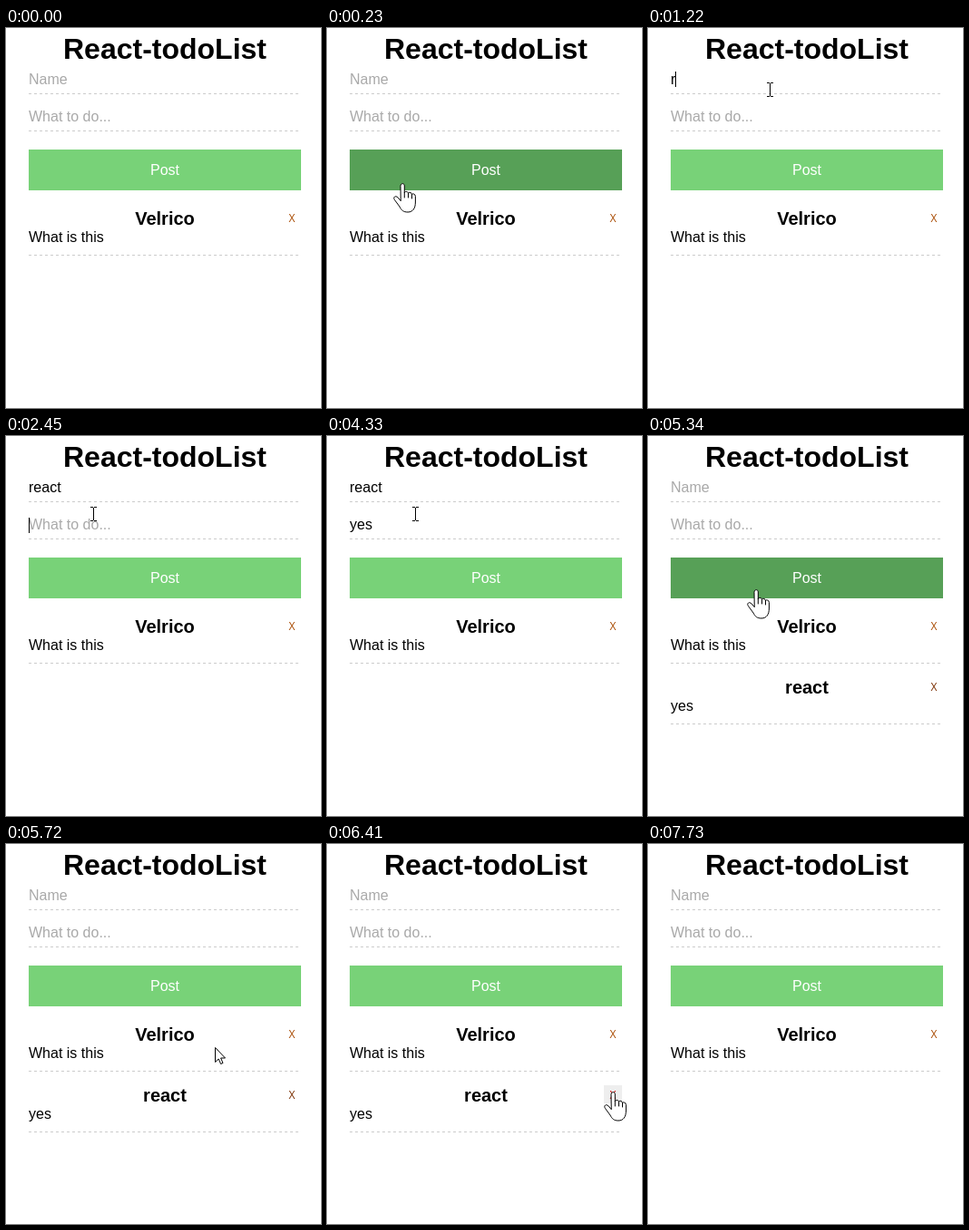
These frames come from a looping animation (347x419 px, 8510 ms). An HTML page:

```html
<!DOCTYPE html>
<html lang="en">
<head>
<meta charset="utf-8">
<title>React-todoList</title>
<style>
  html, body { margin: 0; width: 100%; height: 100%; overflow: hidden; background: #fff; }
  body { position: relative; font: 16px/17px "Liberation Sans", Arial, sans-serif; color: #000; }
  body * { position: absolute; margin: 0; box-sizing: border-box; white-space: pre; }
  h1 { left: 25px; top: 5px; width: 300px; font-size: 32px; line-height: 36px; text-align: center; }
  .field, .item { left: 25px; width: 300px;
    background: repeating-linear-gradient(90deg, #ccc 0 3px, transparent 3px 6px) bottom / 100% 1px no-repeat; }
  .field { height: 26px; }
  .field.empty .text { color: #a9a9a9; }
  .text { left: 0; top: 1px; }
  .caret { left: 100%; top: 0; width: 1px; height: 17px; background: #000; }
  .empty .caret { left: 0; top: 1px; }
  #post { left: 25px; top: 134px; width: 300px; height: 45px; padding-top: 14px;
          background: #78d278; color: #fff; text-align: center; }
  #post.hover { background: #57a057; }
  .item { height: 52px; }
  .item h2 { left: 0; top: 0; width: 300px; font-size: 20px; line-height: 22px; text-align: center; }
  .item p { left: 0; top: 23px; }
  .item b { left: 280px; top: 0; width: 20px; height: 20px; text-align: center; color: #a84a00;
            font: 500 12px/22px "Open Sans", "Noto Sans", sans-serif; }
  #second b { color: #7a2e00; }
  #second b.hover { background: #eee; color: #c00; }
  svg { left: 0; top: 0; width: 347px; height: 419px; overflow: hidden; }
</style>
</head>
<body>
<h1>React-todoList</h1>
<div class="field" id="name" style="top:47px"><span class="text"></span></div>
<div class="field" id="task" style="top:88px"><span class="text"></span></div>
<div id="post">Post</div>
<div class="item" style="top:199px"><h2>Velrico</h2><p>What is this</p><b>X</b></div>
<div class="item" id="second" style="top:266px"><h2>react</h2><p>yes</p><b id="del">X</b></div>
<svg>
  <g id="arrow" fill="#fff" stroke="#000">
    <path d="M.5 .5V16.5L4.2 13 6.6 18.5 9 17.5 6.6 12H11.5Z"/>
  </g>
  <g id="beam" shape-rendering="crispEdges">
    <path d="M-3-8h3v1h1v-1h3v1h-3v14h3v1h-3v-1h-1v1h-3v-1h3v-14h-3z"/>
  </g>
  <g id="hand" fill="#fff" stroke="#000" stroke-linejoin="round" stroke-linecap="round">
    <path d="M-2 3C-2-.2 2.3-.2 2.3 3V11C2.3 8.8 6.5 8.8 6.5 11.5C6.5 9.6 10.5 9.8 10.5 12.8
             C10.5 11.2 14.4 11.6 14.4 14.6V21C14.4 28 11.5 32 6 32C1 32-1 30-3 26L-8.6 18.4
             C-10.6 15.4-7.4 13.4-5 15.8L-2 19.4Z"/>
    <path fill="none" d="M2.3 11V16M6.5 11.5V16M10.5 12.8V17"/>
  </g>
</svg>
<script>
const LOOP = 8510, TICK = 75, KEY_GAP = 115, BLINK = 540;
const POSTED = 5030, DELETED = 7190, LEFT_X = 7420, EXIT = 7730;
const $ = id => document.getElementById(id);

const fields = [
  { id: "name", hint: "Name", word: "react", click: 840, type: 1220 },
  { id: "task", hint: "What to do...", word: "yes", click: 2450, type: 3550 }
];

// the pointer travels to x, y between the two times
const entry = { x: 125, y: 459 };
const stops = [
  { from: 70, to: 380, x: 64, y: 46 },
  { from: 610, to: 610, x: 64, y: 53 },
  { from: 1070, to: 1220, x: 134, y: 68 },
  { from: 1690, to: 2070, x: 108, y: 104 },
  { from: 2220, to: 2300, x: 96, y: 86 },
  { from: 3000, to: 3000, x: 97, y: 86 },
  { from: 4580, to: 4800, x: 118, y: 151 },
  { from: 5340, to: 5340, x: 119, y: 169 },
  { from: 5420, to: 6180, x: 323, y: 270 },
  { from: 6260, to: 6410, x: 315, y: 273 },
  { from: LEFT_X, to: 7650, x: 342, y: 402 }
];

function pointer(t) {
  if (t < stops[0].from || t >= EXIT) return null;
  const i = stops.findLastIndex(s => t >= s.from);
  const a = stops[i - 1] || entry, b = stops[i];
  const steps = Math.round((b.to - b.from) / TICK) + 1;
  const u = Math.min(1, (Math.floor((t - b.from) / TICK) + 1) / steps);
  const left = (1 - u) ** 1.3;
  return { x: Math.round(b.x + (a.x - b.x) * left), y: Math.round(b.y + (a.y - b.y) * left) };
}

const inside = (p, x, y, w, h) => !!p && p.x >= x && p.x < x + w && p.y >= y && p.y < y + h;

function drawField({ id, hint, word, click, type }, t) {
  const keys = Math.max(0, Math.min(word.length, Math.floor((t - type) / KEY_GAP) + 1));
  const text = t < POSTED ? word.slice(0, keys) : "";
  const lastInput = keys ? type + (keys - 1) * KEY_GAP : click;
  const span = $(id).firstElementChild;
  $(id).classList.toggle("empty", !text);
  span.textContent = text || hint;
  if (t >= click && t - lastInput < BLINK) {
    const caret = document.createElement("i");
    caret.className = "caret";
    span.append(caret);
  }
}

function draw(t) {
  for (const field of fields) drawField(field, t);

  const p = pointer(t);
  const onField = inside(p, 25, 38, 300, 76);
  const onPost = inside(p, 25, 134, 300, 45);
  const onDel = t >= POSTED && t < LEFT_X && inside(p, 305, 266, 20, 20);
  $("post").classList.toggle("hover", onPost);
  $("del").classList.toggle("hover", onDel);
  $("second").style.display = t >= POSTED && t < DELETED ? "block" : "none";

  const kind = !p ? "" : onPost || onDel ? "hand" : onField ? "beam" : "arrow";
  for (const id of ["arrow", "beam", "hand"]) {
    $(id).style.display = id === kind ? "inline" : "none";
    if (p) $(id).setAttribute("transform", `translate(${p.x} ${p.y})`);
  }
}

const begin = performance.now();
function tick() {
  draw((performance.now() - begin) % LOOP);
  requestAnimationFrame(tick);
}
draw(0);
requestAnimationFrame(tick);
</script>
</body>
</html>
```
